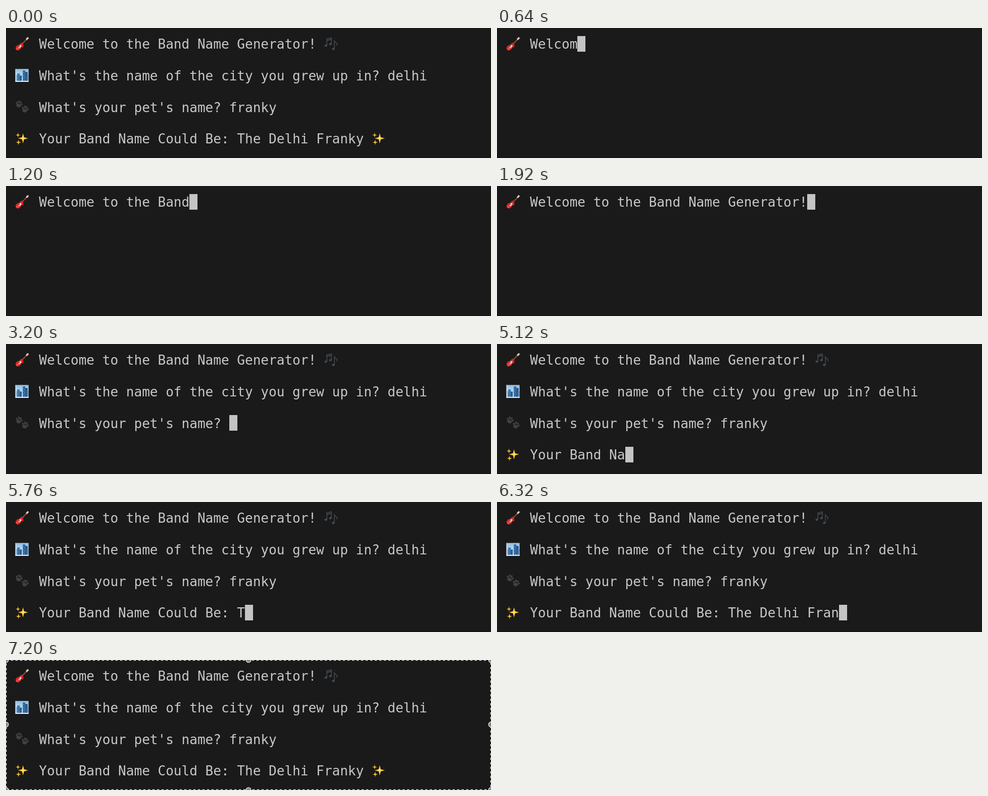
An HTML page with a canvas that plays this animation: 960x258 px, repeating every 7.28 s.

```html
<!DOCTYPE html>
<html lang="en">
<head>
<meta charset="utf-8">
<title>Band Name Generator</title>
<style>
  html, body { margin: 0; width: 100%; height: 100%; overflow: hidden; background: #1a1a1a; }
  canvas { display: block; }
</style>
</head>
<body>
<canvas id="stage" width="960" height="258"></canvas>
<script>
const ctx = document.getElementById('stage').getContext('2d');
const W = 960, H = 258, LOOP = 7280, TICK = 80;
const CELL = 15.69, LEFT = 18.2, ROW = 62.8, BASE = 41, KEY = 44.5;
const BG = '#1a1a1a', INK = '#c8c8c8', CURSOR = '#c4c4c4';

const TITLE = 'Welcome to the Band Name Generator!';
const ASK_CITY = "What's the name of the city you grew up in? ";
const ASK_PET = "What's your pet's name? ";
const RESULT = 'Your Band Name Could Be: The Delhi Franky';
const CITY = 'delhi', PET = 'franky';
const CITY_KEYS = [2240, 2320, 2400, 2560, 2720];
const PET_KEYS = [3360, 3520, 3600, 3760, 3920, 4080];

function ellipse(x, y, rx, ry, color, turn = 0) {
  ctx.fillStyle = color;
  ctx.beginPath();
  ctx.ellipse(x, y, rx, ry, turn, 0, Math.PI * 2);
  ctx.fill();
}

function line(color, width, ...pts) {
  ctx.strokeStyle = color;
  ctx.lineWidth = width;
  ctx.beginPath();
  for (let i = 0; i < pts.length; i += 2) ctx.lineTo(pts[i], pts[i + 1]);
  ctx.stroke();
}

function rect(color, x, y, w, h) {
  ctx.fillStyle = color;
  ctx.fillRect(x, y, w, h);
}

// Icons are drawn in a box of about 28 by 28 pixels.
function guitar() {
  line('#5a2a20', 3, 12, 16, 23, 5);
  line('#b98b70', 1, 12.5, 15, 23, 4.5);
  line('#e8c9b4', 3.4, 22, 5.5, 26, 1.5);
  ellipse(12, 16, 4.6, 3.2, '#d9231f', -0.8);
  ellipse(6.2, 21.5, 6, 5, '#d9231f', -0.8);
  ellipse(14.5, 19, 2.6, 2, '#b91a18', -0.6);
  ellipse(4.6, 23.5, 3, 2.4, '#f0443a', -0.8);
  ellipse(10, 19, 4, 2.2, '#e9e4e4', -0.9);
  line('#55545a', 1.2, 7, 18, 10, 21);
  line('#55545a', 1.2, 10, 15.5, 13, 18);
}

function skyline() {
  const sky = ctx.createLinearGradient(0, 1, 0, 27);
  sky.addColorStop(0, '#8fc0e6');
  sky.addColorStop(1, '#e2f0f8');
  ctx.fillStyle = sky;
  ctx.fillRect(0.5, 1, 26, 25.5);
  rect('#f4f8fa', 0.5, 1, 1, 25.5);
  rect('#7fa9cb', 2, 13, 4, 12);
  rect('#386fa5', 4, 10, 5, 15);
  rect('#24588f', 9, 14, 4, 11);
  rect('#2d659c', 15, 4, 5, 21);
  rect('#1f4a7c', 20, 7, 4.5, 18);
  rect('#4f86b8', 23, 13, 3, 12);
  for (let i = 0; i < 6; i++) {
    rect('#78a9d2', 16 + (i % 2) * 2, 7 + i * 3, 1, 1.5);
    rect('#5889bb', 21 + (i % 2), 9 + i * 2.5, 1, 1);
    if (i < 4) rect('#82afd2', 5 + (i % 2) * 2, 12 + i * 3, 1, 1.5);
  }
  rect('#e9f1f5', 0.5, 24.5, 26, 2);
}

function paw(x, y, turn) {
  ctx.save();
  ctx.translate(x, y);
  ctx.rotate(turn);
  const c = '#414141';
  ellipse(0, 2.8, 4.6, 3.5, c);
  ellipse(-5.2, -1, 1.7, 2.5, c, -0.4);
  ellipse(-2, -4.2, 1.8, 2.7, c, -0.1);
  ellipse(2, -4.2, 1.8, 2.7, c, 0.1);
  ellipse(5.2, -1, 1.7, 2.5, c, 0.4);
  ctx.restore();
}

function paws() {
  paw(7.5, 8, 0.35);
  paw(19.5, 18, 0.35);
}

function notes() {
  const c = '#444a50';
  line(c, 1.5, 5, 17, 5, 4, 14, 2, 14, 14);
  line(c, 2, 5, 7, 14, 5);
  ellipse(3, 17.5, 2.8, 2.1, c, -0.3);
  ellipse(12, 14.5, 2.8, 2.1, c, -0.3);
  line(c, 1.5, 20, 24, 20, 8, 22, 11, 25, 13, 25, 17);
  ellipse(17.8, 24, 2.8, 2.2, c, -0.3);
}

function star(x, y, r, color) {
  ctx.fillStyle = color;
  ctx.beginPath();
  ctx.moveTo(x, y - r);
  for (let i = 1; i <= 8; i++) {
    const a = -Math.PI / 2 + i * Math.PI / 4;
    const d = i % 2 ? r * 0.3 : r;
    ctx.lineTo(x + d * Math.cos(a), y + d * Math.sin(a));
  }
  ctx.fill();
}

function sparkles() {
  star(15.5, 13, 10, '#fbc52c');
  star(15.5, 13, 5.5, '#ffe078');
  star(5.5, 6.5, 4.8, '#fbc52c');
  star(6.5, 21, 5.2, '#fbc52c');
}

function icon(draw, row, col) {
  ctx.save();
  ctx.translate(LEFT + col * CELL, 17.5 + row * ROW);
  draw();
  ctx.restore();
}

const write = (text, row) => {
  ctx.fillStyle = INK;
  ctx.fillText(text, LEFT + 3 * CELL, BASE + row * ROW);
};

function cursor(row, col) {
  const x = Math.round(LEFT + col * CELL), y = Math.round(15.7 + row * ROW);
  rect(CURSOR, x, y, 16, 31);
}

// Types icon, space, text, space, icon; returns the cursor column.
function typed(row, head, text, tail, n) {
  const size = text.length;
  if (n > 0) icon(head, row, 0);
  write(text.slice(0, Math.max(0, n - 2)), row);
  if (n >= size + 4) icon(tail, row, size + 4);
  const col = n > 0 ? n + 1 : 0;
  return n >= size + 4 ? size + 6 : col;
}

function prompt(row, draw, text) {
  icon(draw, row, 0);
  write(text, row);
  return 3 + text.length;
}

const answer = (word, keys, t) => word.slice(0, keys.filter(k => k <= t).length);
const count = (t, start) => Math.max(0, Math.floor((t - start) / KEY));

function selection(alpha) {
  ctx.save();
  ctx.globalAlpha = alpha;
  for (const [color, dash] of [['#000', []], ['#eee', [5, 4]]]) {
    ctx.setLineDash(dash);
    ctx.strokeStyle = color;
    ctx.lineWidth = 1.5;
    ctx.strokeRect(0.5, 0.5, W - 1, H - 1);
  }
  ctx.setLineDash([]);
  for (const x of [0, W / 2, W]) {
    for (const y of [0, 128, H]) {
      if (x === W / 2 && y === 128) continue;
      ellipse(x, y, 5.5, 5.5, '#e6e6e6');
      ellipse(x, y, 4.2, 4.2, '#858585');
    }
  }
  ctx.restore();
}

function draw(time) {
  let t = Math.floor((time % LOOP) / TICK) * TICK;
  const opening = t < 160;
  if (opening) t = 6800;

  rect(BG, 0, 0, W, H);
  rect('#150f11', 0, H - 1, W, 1);
  ctx.font = '26.06px "DejaVu Sans Mono", monospace';

  let row = 0;
  let col = typed(0, guitar, TITLE, notes, count(t, 243));
  if (t >= 2080) {
    row = 1;
    col = prompt(1, skyline, ASK_CITY + answer(CITY, CITY_KEYS, t));
  }
  if (t >= 2960) {
    row = 2;
    col = prompt(2, paws, ASK_PET + answer(PET, PET_KEYS, t));
  }
  if (t >= 4520) {
    row = 3;
    col = typed(3, sparkles, RESULT, sparkles, count(t, 4474));
  }
  if (t < 6560) cursor(row, col);
  if (t >= 6960) selection(Math.min(1, (t - 6880) / 320));
}

function frame(now) {
  draw(now);
  requestAnimationFrame(frame);
}
draw(0);
requestAnimationFrame(frame);
</script>
</body>
</html>
```
